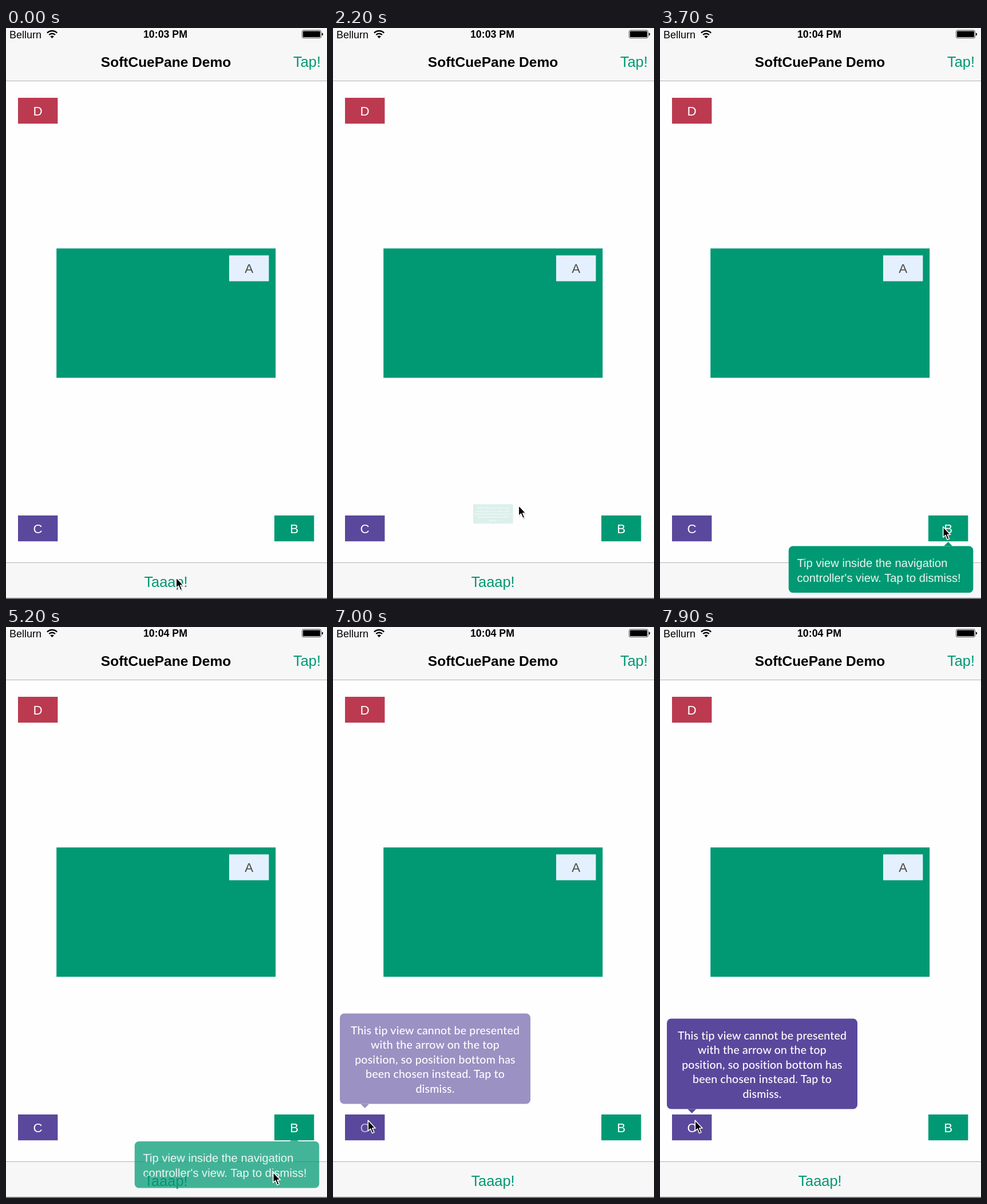
These frames come from a looping animation (561x998 px, 8 s). An HTML page:

```html
<!DOCTYPE html>
<html lang="en">
<head>
<meta charset="utf-8">
<title>Tooltip demo</title>
<style>
  html, body { margin: 0; width: 100%; height: 100%; overflow: hidden; background: #fefefe; }
  svg { display: block; width: 100%; height: 100%; font-family: "Liberation Sans", Arial, sans-serif; }
  .mid { text-anchor: middle; }
  .bold { font-weight: 700; }
  .bar { font-size: 25.4px; fill: #009874; }
  .letter { font-size: 22.4px; fill: #fff; text-anchor: middle; }
  .round { font: 500 19.5px Lato, "Open Sans", sans-serif; letter-spacing: .2px; fill: #fff; text-anchor: middle; }
  .light { font-size: 20.2px; fill: #e9f6f2; }
  .tip text { text-rendering: geometricPrecision; }
</style>
</head>
<body>
<svg id="stage" viewBox="0 0 561 998">
  <rect width="561" height="998" fill="#fefefe"/>
  <rect width="561" height="92" fill="#f7f7f7"/>
  <rect y="92" width="561" height="1" fill="#b4b4b4"/>
  <rect y="934" width="561" height="64" fill="#f7f7f7"/>
  <rect y="934" width="561" height="1" fill="#b4b4b4"/>
  <rect y="996" width="561" height="2" fill="#77777b"/>

  <text x="6" y="17.5" font-size="18">Bellurn</text>
  <g fill="none" stroke="#000" stroke-width="2.5">
    <path d="M72 8.6a12.2 12.2 0 0 1 17.2 0"/>
    <path d="M75.3 12a7.4 7.4 0 0 1 10.6 0"/>
  </g>
  <path d="M80.6 18l-3.2-3.3a4.6 4.6 0 0 1 6.4 0z"/>
  <text id="clock" class="mid bold" x="278.5" y="17.3" font-size="17.8"></text>
  <rect x="517.5" y="4" width="33" height="13.6" rx="2.5" fill="none" stroke="#000" stroke-opacity=".7"/>
  <rect x="519" y="5.5" width="30" height="10.6" rx="1.2"/>
  <path d="M552 8.2q2.2 .6 2.2 2.6t-2.2 2.6z"/>

  <text class="mid bold" x="279.5" y="68" font-size="24.5">SoftCuePane Demo</text>
  <text class="bar" x="502" y="68">Tap!</text>
  <text id="tap" class="bar mid" x="279.5" y="977">Taaap!</text>

  <rect x="88.2" y="385.3" width="383" height="226.1" fill="#009973"/>
  <g id="buttons"></g>
  <g id="tips"></g>
  <g id="cursor">
    <path id="arrow" d="M.8 1.2V19.8L5 16L8.2 23.8L11.4 22.4L8.3 15H13.6Z" transform="translate(.8 1.8)" opacity=".25"/>
    <use href="#arrow" x="-.8" y="-1.8" opacity="0"/>
    <path d="M.8 1.2V19.8L5 16L8.2 23.8L11.4 22.4L8.3 15H13.6Z" stroke="#fff" stroke-width="1.6" stroke-linejoin="round"/>
  </g>
</svg>
<script>
const LOOP = 8000;
const GREEN = "#009973", PURPLE = "#5a489c";
const $ = id => document.getElementById(id);

function add(parent, tag, attrs, text) {
  const el = document.createElementNS("http://www.w3.org/2000/svg", tag);
  for (const k in attrs) el.setAttribute(k, attrs[k]);
  if (text) el.textContent = text;
  parent.appendChild(el);
  return el;
}

function button(letter, x, y, fill, color) {
  add($("buttons"), "rect", { x, y, width: 69.4, height: 45.2, fill });
  return add($("buttons"), "text",
    { class: "letter", x: x + 34.7, y: y + 30.6, style: color ? "fill:" + color : "" }, letter);
}

// Rounded bubble with an arrow whose point is (ax, ay).
function bubble(x, y, w, h, ax, ay, fill, font, tx, ty, lines) {
  const g = add($("tips"), "g", { class: "tip" });
  const base = ay < y ? y : y + h;
  add(g, "rect", { x, y, width: w, height: h, rx: 7.5, fill });
  add(g, "path", { d: `M${ax - 7.5} ${base}L${ax} ${ay}L${ax + 7.5} ${base}Z`, fill });
  lines.forEach((s, i) => add(g, "text", { class: font, x: tx, y: ty + i * 25.4 }, s));
  return g;
}

button("D", 21, 122, "#bb3a50");
button("A", 390, 397.4, "#e4f0fd", "#4a4a4a");
const labelC = button("C", 21, 852, PURPLE);
const labelB = button("B", 469, 852, GREEN);

const tipTap = bubble(118, 767.5, 323.5, 158, 279.8, 932.5, GREEN, "round", 279.8, 804, [
  "SoftCuePane is an easy to use",
  "tooltip view. It can point to any",
  "QXPane or QXRowPart subclasses.",
  "Tap the buttons to see other",
  "tooltips."]);
const tipB = bubble(224.8, 905, 322.6, 81.5, 503.7, 897.5, GREEN, "light", 239.5, 941.5, [
  "Tip view inside the navigation",
  "controller's view. Tap to dismiss!"]);
const tipC = bubble(12, 684.5, 333, 158, 55.7, 850, PURPLE, "round", 178.5, 721, [
  "This tip view cannot be presented",
  "with the arrow on the top",
  "position, so position bottom has",
  "been chosen instead. Tap to",
  "dismiss."]);

// Cursor moves: start, end, from x, y, to x, y
const MOVES = [
  [1250, 1850, 296.5, 959, 323.5, 833],
  [2450, 3000, 323.5, 833, 494, 870.5],
  [4050, 4700, 494, 870.5, 466, 951.5],
  [5750, 6300, 466, 951.5, 60.5, 861]
];

const clamp = v => Math.min(1, Math.max(0, v));
const ease = (t, a, b) => { const x = clamp((t - a) / (b - a)); return x * x * (3 - 2 * x); };

function spring(ms, zeta, omega) {
  if (ms <= 0) return 0;
  const t = ms / 1000, d = zeta * omega, w = omega * Math.sqrt(1 - zeta * zeta);
  return 1 - Math.exp(-d * t) * (Math.cos(w * t) + d / w * Math.sin(w * t));
}

function pose(el, opacity, transform) {
  el.setAttribute("opacity", clamp(opacity));
  el.setAttribute("transform", transform);
}

const press = (el, t, at) => el.setAttribute("opacity", t >= at && t < at + 250 ? .6 : 1);

function draw(t) {
  $("clock").textContent = t < 2700 ? "10:03 PM" : "10:04 PM";
  press($("tap"), t, 390);
  press(labelB, t, 3150);
  press(labelC, t, 6780);

  const showTap = spring(t - 390, .6, 20), hideTap = ease(t, 2007, 2257);
  const scale = showTap * (1 - .9 * hideTap);
  pose(tipTap, showTap * (1 - hideTap), `translate(279.8 850) scale(${scale}) translate(-279.8 -850)`);

  const showB = spring(t - 3150, .7, 6.6), hideB = ease(t, 5030, 5530);
  pose(tipB, showB * (1 - hideB), `translate(0 ${-22.4 * (1 - showB + hideB)})`);

  const showC = spring(t - 6750, .7, 6.6);
  pose(tipC, showC, `translate(0 ${-22.4 * (1 - showC)})`);

  let [, , x, y] = MOVES[0];
  for (const [a, b, x0, y0, x1, y1] of MOVES) {
    if (t < a) break;
    const p = ease(t, a, b);
    x = x0 + (x1 - x0) * p;
    y = y0 + (y1 - y0) * p;
  }
  $("cursor").setAttribute("transform", `translate(${x} ${y})`);
}

const start = performance.now();
function tick() {
  draw((performance.now() - start) % LOOP);
  requestAnimationFrame(tick);
}
tick();
</script>
</body>
</html>
```
